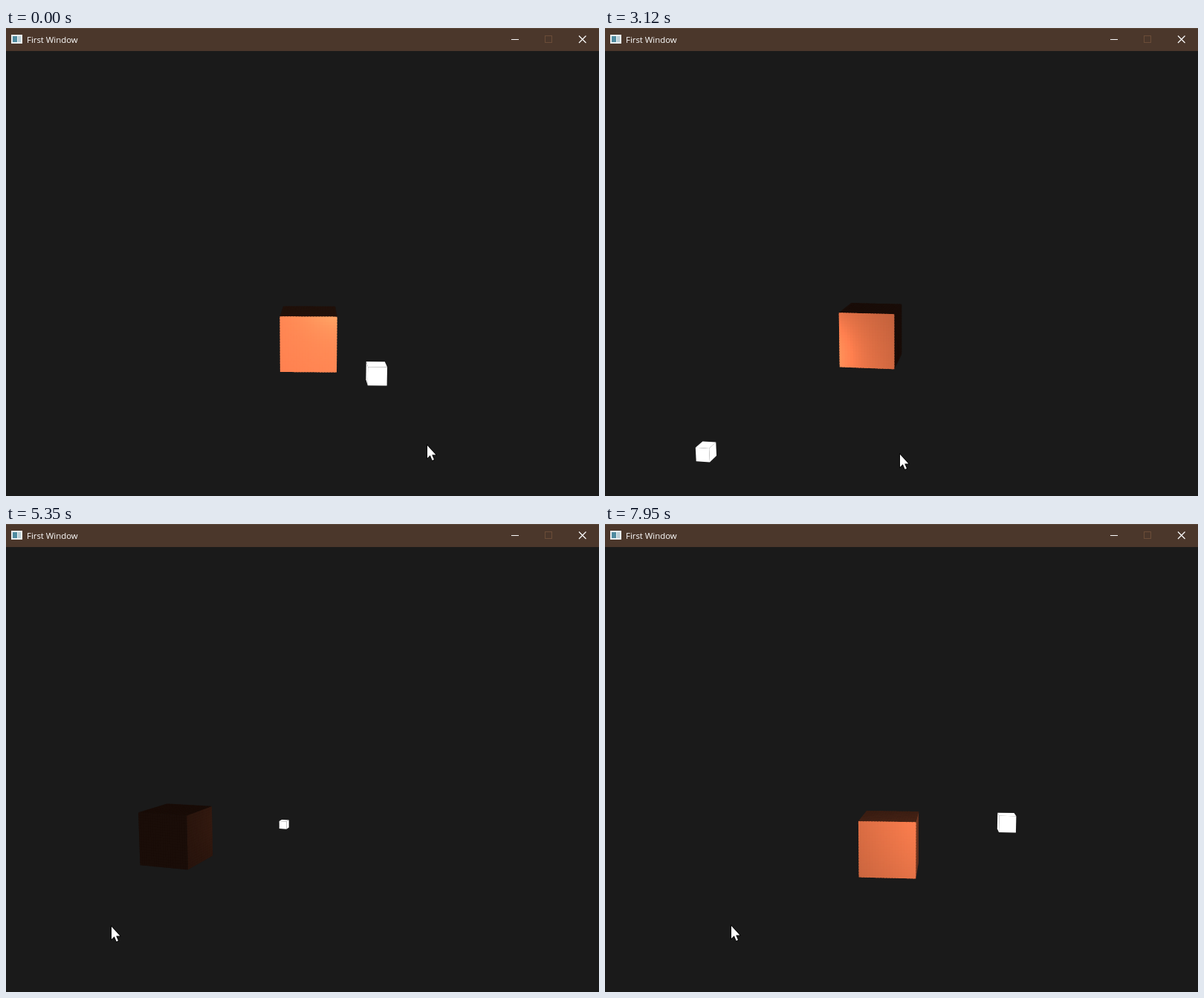
Write an HTML page with a canvas that moves like this. It is 798x630 px and loops after 8000 ms.

```html
<!DOCTYPE html>
<html lang="en">
<head>
<meta charset="utf-8">
<title>First Window</title>
<style>
  html, body { margin: 0; width: 100%; height: 100%; overflow: hidden; background: #1a1a1a; }
  canvas { position: absolute; left: 0; top: 0; }
  header {
    position: absolute; left: 0; top: 0; width: 798px; height: 31px; box-sizing: border-box;
    background: #4b372b; border-top: 1px solid #5b483b;
    font: 11.4px/16px "Open Sans", "Noto Sans", sans-serif; color: #fff;
  }
  header span { position: absolute; left: 28px; top: 7px; white-space: nowrap; }
  header svg { position: absolute; left: 0; top: -1px; }
</style>
</head>
<body>
<canvas id="view" width="798" height="630"></canvas>
<header>
  <svg width="798" height="31" fill="none" shape-rendering="crispEdges">
    <rect x="7" y="9" width="15" height="12" fill="#e9eef0"/>
    <rect x="9" y="11" width="6" height="8" fill="#4f8ba0"/>
    <rect x="16" y="11" width="4" height="8" fill="#bcd0d8"/>
    <path d="M680 15.5h10" stroke="#fff"/>
    <rect x="725.5" y="10.5" width="9" height="9" stroke="#6b4c38"/>
    <path d="M771 10.5l9.5 9.5M780.5 10.5l-9.5 9.5" stroke="#fff" stroke-width="1.2" shape-rendering="auto"/>
  </svg>
  <span>First Window</span>
</header>
<script>
const ctx = document.getElementById('view').getContext('2d');
const LOOP = 8000, STEPS = 118;
const CENTER = [399, 331], FOCAL = 724, EYE_HEIGHT = 2.35;
const RAD = Math.PI / 180;

// The viewer's moves: step, cube x, cube y, cube depth, yaw, cursor x, cursor y
const MOVES = [
  [0, 407.5, 417, 9.95, 1.5, 567, 562],
  [33, 401, 413, 9.86, 1.7, 563, 574],
  [46, 359, 412.5, 10.1, 7.5, 397, 574],
  [65, 270.5, 420, 10.3, 13, 235, 545],
  [79, 230, 418.5, 10.35, 17, 142, 542],
  [89, 258, 433, 10.2, 12, 146, 539],
  [94, 102, 476.5, 9.24, -3, 192, 532],
  [117, 383.5, 429.5, 9.84, 4.5, 170, 541]];

// Monotone cubic interpolation between keyed rows
function sample(rows, at) {
  const last = rows.length - 2;
  const found = rows.findIndex(row => row[0] > at);
  const i = found < 0 ? last : found - 1;
  const span = rows[i + 1][0] - rows[i][0], u = (at - rows[i][0]) / span;
  return rows[i].slice(1).map((from, k) => {
    const value = j => rows[j][k + 1];
    const slope = j => {
      const n = Math.min(last, Math.max(0, j));
      return (value(n + 1) - value(n)) / (rows[n + 1][0] - rows[n][0]);
    };
    const blend = (a, b) => a * b > 0 ? 2 * a * b / (a + b) : 0;
    const m0 = blend(slope(i - 1), slope(i)) * span;
    const m1 = blend(slope(i), slope(i + 1)) * span;
    const d = value(i + 1) - from;
    return from + u * (m0 + u * (3 * d - 2 * m0 - m1 + u * (m0 + m1 - 2 * d)));
  });
}

const mix = (a, b, u) => a.map((v, i) => v + (b[i] - v) * u);
const dot = (a, b) => a.reduce((sum, v, i) => sum + v * b[i], 0);
const toward = (from, to) => {
  const d = to.map((v, i) => v - from[i]), length = Math.hypot(...d);
  return d.map(v => v / length);
};
const bilinear = (q, u, v) => mix(mix(q[0], q[1], u), mix(q[3], q[2], u), v);

// World origin is the coral cube; the eye keeps a constant height above it
function makeCamera(x, y, depth, yawDegrees) {
  const yaw = yawDegrees * RAD;
  const pitch = Math.asin(EYE_HEIGHT / depth) - Math.atan((y - CENTER[1]) / FOCAL);
  const [sy, cy, sp, cp] = [Math.sin(yaw), Math.cos(yaw), Math.sin(pitch), Math.cos(pitch)];
  const right = [cy, 0, -sy];
  const up = [-sy * sp, cp, -cy * sp];
  const front = [-sy * cp, -sp, -cy * cp];
  const offset = [(x - CENTER[0]) * depth / FOCAL, (CENTER[1] - y) * depth / FOCAL, depth];
  return {
    eye: right.map((r, i) => -(offset[0] * r + offset[1] * up[i] + offset[2] * front[i])),
    depth: p => dot(p, front) + offset[2],
    project(p) {
      const scale = FOCAL / this.depth(p);
      return [CENTER[0] + scale * (dot(p, right) + offset[0]),
        CENTER[1] - scale * (dot(p, up) + offset[1])];
    }
  };
}

// Light and lamp share one closed path around the cube
function lightAt(step) {
  const angle = (18.5 + 6.38 * step) * RAD;
  return [2.45 * Math.sin(angle), 1.05 * Math.sin(2 * angle), 4.4 * Math.cos(angle)];
}

function polygon(points, color) {
  ctx.fillStyle = color;
  ctx.beginPath();
  points.forEach(p => ctx.lineTo(...p));
  ctx.closePath();
  ctx.fill();
}

// Phong shading of a coral surface
function shade(point, normal, light, eye) {
  const l = toward(point, light), facing = dot(normal, l);
  let level = .1;
  if (facing > 0) {
    const reflected = normal.map((n, i) => 2 * facing * n - l[i]);
    level += facing + .5 * Math.max(0, dot(reflected, toward(point, eye))) ** 32;
  }
  return `rgb(${[255, 127.5, 79].map(c => Math.min(255, Math.round(c * level)))})`;
}

// Faces of a cube that are turned to the eye, as corners in world space
function visibleFaces(center, size, eye) {
  const faces = [];
  for (let axis = 0; axis < 3; axis++) for (const sign of [-1, 1]) {
    const normal = [0, 0, 0];
    normal[axis] = sign;
    const corners = [[-1, -1], [1, -1], [1, 1], [-1, 1]].map(([a, b]) => {
      const c = [...center];
      c[axis] += sign * size / 2;
      c[(axis + 1) % 3] += a * size / 2;
      c[(axis + 2) % 3] += b * size / 2;
      return c;
    });
    if (dot(normal, toward(corners[0], eye)) > 0) faces.push({ normal, corners });
  }
  return faces;
}

function drawCube(camera, light) {
  const N = 20, end = v => Math.min(1, v + 1.5 / N);
  for (const { normal, corners } of visibleFaces([0, 0, 0], 1, camera.eye)) {
    for (let i = 0; i < N; i++) for (let j = 0; j < N; j++) {
      const u = i / N, v = j / N;
      const cell = [[u, v], [end(u), v], [end(u), end(v)], [u, end(v)]];
      const middle = bilinear(corners, u + .5 / N, v + .5 / N);
      polygon(cell.map(c => camera.project(bilinear(corners, ...c))),
        shade(middle, normal, light, camera.eye));
    }
  }
}

function drawLamp(camera, light) {
  for (const { corners } of visibleFaces(light, .2, camera.eye))
    polygon(corners.map(c => camera.project(c)), '#fff');
}

function drawCursor(x, y) {
  const arrow = new Path2D('M0 0V17L3.8 13.3L6.6 20L9 19L6.2 12.4H11.4Z');
  ctx.save();
  ctx.translate(x, y);
  ctx.strokeStyle = '#000';
  ctx.lineWidth = 1.5;
  ctx.stroke(arrow);
  ctx.fillStyle = '#fff';
  ctx.fill(arrow);
  ctx.restore();
}

function draw(time) {
  const step = Math.min(STEPS - 1, Math.floor(time % LOOP / LOOP * STEPS + .4));
  const [x, y, depth, yaw, cursorX, cursorY] = sample(MOVES, step);
  const camera = makeCamera(x, y, depth, yaw);
  const light = lightAt(step);

  ctx.fillStyle = '#1a1a1a';
  ctx.fillRect(0, 0, 798, 630);
  const lampBehind = camera.depth(light) > depth;
  const order = lampBehind ? [drawLamp, drawCube] : [drawCube, drawLamp];
  order.forEach(part => part(camera, light));
  drawCursor(cursorX, cursorY);
}

const begin = performance.now();
function tick() {
  draw(performance.now() - begin);
  requestAnimationFrame(tick);
}
tick();
</script>
</body>
</html>
```
